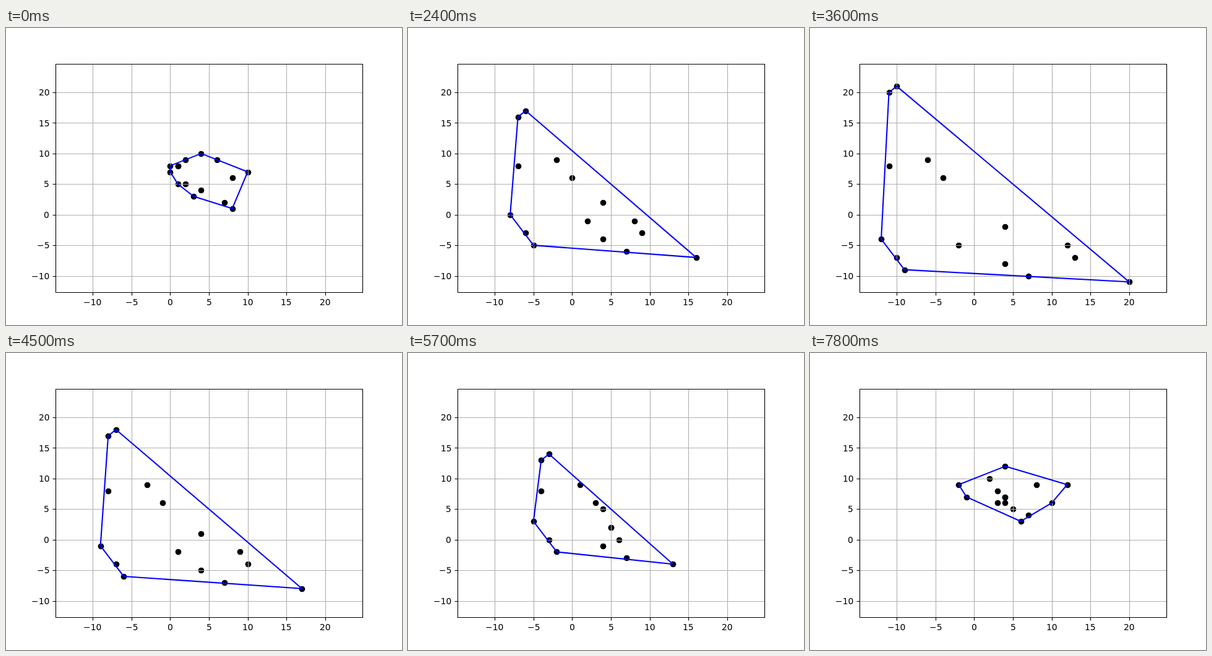
Animation, 640 px wide and 480 px high, one loop 8000 ms. Source, as an HTML page:

```html
<!DOCTYPE html>
<html lang="en">
<head>
<meta charset="utf-8">
<title>Convex hull of moving points</title>
<style>
  html, body { margin: 0; width: 100%; height: 100%; overflow: hidden; background: #fff; }
  svg { display: block; }
  text { font: 13.889px "DejaVu Sans", sans-serif; fill: #000; }
  .grid { stroke: #b0b0b0; }
  .axis { stroke: #000; }
  .grid, .axis { fill: none; stroke-width: 1.111; }
  .hull { fill: none; stroke: #00f; stroke-width: 2.083; stroke-linejoin: round; }
</style>
</head>
<body>
<svg id="stage" width="640" height="480" viewBox="0 0 640 480"></svg>
<script>
const LOOP = 8000, STEP = 300, TURN = 12;
const EM = 13.889, DIGIT = 0.6362, MINUS = 0.8379;

// x, y, and the shift in x and y per step
const points = [
  [0, 8, -1, -1], [1, 8, -1, 0], [1, 8, -1, 1], [2, 9, -1, 1], [2, 5, -1, -1],
  [3, 3, -1, -1], [6, 9, -1, 0], [8, 6, -1, 0], [4, 10, 0, -1], [10, 7, -1, -1],
  [4, 4, 0, -1], [7, 2, 0, -1], [0, 7, 1, -1], [1, 5, 1, -1], [8, 1, 1, -1]
];

const stage = document.getElementById("stage");
const px = x => 80 + (x + 14.8) * 496 / 39.6;
const py = y => 427.2 - (y + 12.7) * 369.6 / 37.4;
const snap = v => Math.floor(v + 0.5) + 0.5;

function add(tag, attrs, content) {
  const el = document.createElementNS("http://www.w3.org/2000/svg", tag);
  for (const key in attrs) el.setAttribute(key, attrs[key]);
  if (content) el.textContent = content;
  stage.appendChild(el);
  return el;
}

function label(n, place) {
  const str = String(n).replace("-", "\u2212");
  const digits = String(Math.abs(n)).length;
  const width = EM * (digits * DIGIT + (n < 0 ? MINUS : 0));
  const [x, y] = place(width);
  add("text", { x: Math.round(x), y }, str);
}

const dots = points.map(() => add("circle", { r: 4.86 }));

let grid = "", axis = "M80.5 58.5H576.5V427.5H80.5Z";
const ticks = [-10, -5, 0, 5, 10, 15, 20];
for (const n of ticks) {
  const x = snap(px(n)), y = snap(py(n));
  grid += `M${x} 58.5V427.5M80.5 ${y}H576.5`;
  axis += `M${x} 427.5V432.5M80.5 ${y}H75.5`;
}
add("path", { class: "grid", d: grid });
const hullLine = add("polygon", { class: "hull" });
add("path", { class: "axis", d: axis });
for (const n of ticks) {
  label(n, w => [px(n) - w / 2, 448]);
  label(n, w => [70.28 - w, Math.round(py(n) + 5.2)]);
}

const cross = (o, a, b) =>
  (a[0] - o[0]) * (b[1] - o[1]) - (a[1] - o[1]) * (b[0] - o[0]);

function chain(list) {
  const out = [];
  for (const p of list) {
    while (out.length > 1 && cross(out[out.length - 2], out[out.length - 1], p) <= 0) out.pop();
    out.push(p);
  }
  out.pop();
  return out;
}

function hull(list) {
  const sorted = [...list].sort((a, b) => a[0] - b[0] || a[1] - b[1]);
  return [...chain(sorted), ...chain(sorted.reverse())];
}

let shown = -1;
function draw(time) {
  const step = Math.floor((time % LOOP) / STEP);
  if (step === shown) return;
  shown = step;
  // out until the turn, then back through the start
  const s = TURN - Math.abs(step - TURN);
  const now = points.map(([x, y, dx, dy]) => [x + s * dx, y + s * dy]);
  now.forEach(([x, y], i) => {
    dots[i].setAttribute("cx", snap(px(x)));
    dots[i].setAttribute("cy", snap(py(y)));
  });
  hullLine.setAttribute("points", hull(now).map(([x, y]) => px(x) + "," + py(y)).join(" "));
}

function tick(time) {
  draw(time);
  requestAnimationFrame(tick);
}
draw(0);
requestAnimationFrame(tick);
</script>
</body>
</html>
```
